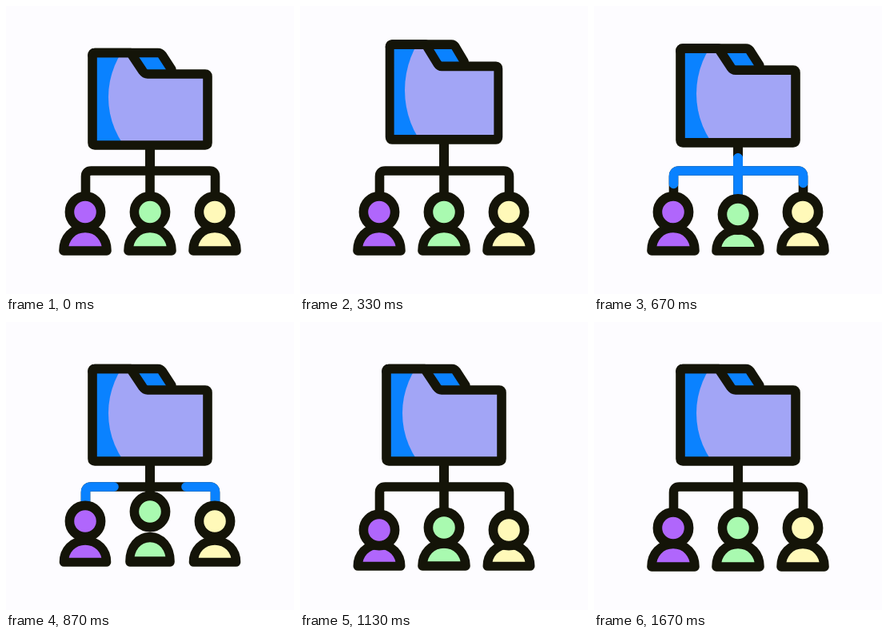
An HTML page that plays this animation: 360 by 360 pixels, repeating every 1870 ms.

```html
<!DOCTYPE html>
<html lang="en">
<head>
<meta charset="utf-8">
<title>Shared folder</title>
<style>
  html, body { margin: 0; width: 100%; height: 100%; overflow: hidden; background: #fdfcff; }
  svg { display: block; width: 100%; height: 100%; }
  .ink { stroke: #141408; stroke-width: 11.6; stroke-linejoin: round; stroke-linecap: round; }
  .wire { fill: none; }
  .pulse { fill: none; stroke: #0a82ff; stroke-width: 11.6; stroke-linejoin: round; stroke-linecap: round; }
</style>
</head>
<body>
<svg viewBox="0 0 360 360">
  <defs>
    <clipPath id="front"><path d="M108 58.5H156L174 85H252V174H108Z"/></clipPath>
  </defs>
  <g id="wires"></g>
  <g id="folder">
    <path fill="#0a82ff" d="M108 58.5H193L208 82V85H252V174H108Z"/>
    <circle cx="231.5" cy="114" r="103.5" fill="#a2a5f6" clip-path="url(#front)"/>
    <path class="ink" fill="none" d="M108 61.5Q108 58.5 111 58.5H190Q193 58.5 195 61L207 79.5"/>
    <path class="ink" fill="none" d="M156 59L171 81.5Q173.500 85 177 85H249Q252 85 252 88V171Q252 174 249 174H111Q108 174 108 171V61.500Q108 58.500 111 58.500H156"/>
  </g>
  <g id="people"></g>
</svg>
<script>
const LOOP = 1870, STEP = 200 / 3, LAST = 25;

// Rows: step, top shift, bottom shift, horizontal scale
const folderMoves = [
  [0, 0, 0, 1], [2, 3, 0, 1], [3, -8, -5, .97], [4, -17, -10, .94], [5, -10.5, -7, .942],
  [6, -2, -2, .98], [7, 1, 0, 1], [8, -2, -1, 1], [9, -5, -2.500, 1], [10, -5.5, -3, 1],
  [11, -3, -1.5, 1], [13, 0, 0, 1]
];

// Rows: step, head shift, body top shift, body bottom shift, horizontal scale
const middleMoves = [
  [7, 0, 0, 0, 1], [10, 3, 3, 0, 1], [11, -3, -1, -2, .99], [12, -13, -6, -5, .96],
  [13, -20.500, -9, -6, .94], [14, -17, -7, -5, .96], [15, -8, -3, -3, .99], [16, 1, 1, 0, 1],
  [17, -.5, -.5, -1, 1], [19, -6, -4, -2, 1], [21, 1, 0, 0, 1], [23, 0, 0, 0, 1]
];
const sideMoves = [
  [10, 0, 0, 0, 1], [11, 2, 2, 0, 1], [12, -3, -2, -3, 1], [13, -8.5, -4, -6, .985],
  [14, -19, -8, -6, .95], [15, -17, -7, -5, .96], [16, -7, -3, -2, .99], [17, 2.5, 1, -1, .99],
  [18, 2, 2, 0, 1], [21, -6, -5, -2, 1], [24, 0, 0, 0, 1]
];

// Rows: step, distance of the pulse's tail and tip along the wire
const pulseMoves = [
  [6, 0, 0], [7, 0, 50], [8, 0, 115], [9, 10, 132], [10, 30, 140], [11, 50, 160], [13, 91, 160], [16, 160, 160]
];

const $ = id => document.getElementById(id);

function add(parent, tag, attrs) {
  const el = document.createElementNS("http://www.w3.org/2000/svg", tag);
  for (const key in attrs) el.setAttribute(key, attrs[key]);
  return parent.appendChild(el);
}

function sample(rows, step) {
  const i = rows.findIndex(row => row[0] >= step);
  if (i < 0) return rows[rows.length - 1].slice(1);
  if (i === 0) return rows[0].slice(1);
  const a = rows[i - 1], b = rows[i];
  const mix = (step - a[0]) / (b[0] - a[0]);
  return a.slice(1).map((v, j) => v + (b[j + 1] - v) * mix);
}

function stretch(el, cx, top, bottom, dTop, dBottom, sx) {
  const sy = (bottom + dBottom - top - dTop) / (bottom - top);
  el.setAttribute("transform",
    `matrix(${sx} 0 0 ${sy} ${cx * (1 - sx)} ${bottom + dBottom - sy * bottom})`);
}

const wirePaths = [
  "M180 160V240",
  "M180 160V206H106.5Q99.5 206 99.5 213V240",
  "M180 160V206H254.5Q261.5 206 261.5 213V240"
];
for (const d of wirePaths) add($("wires"), "path", { d, class: "ink wire" });
const pulses = wirePaths.map(d => {
  const el = add($("wires"), "path", { d, class: "pulse" });
  return { el, length: el.getTotalLength() };
});

const people = [
  [99, "#b066fc", sideMoves], [180, "#a9fab0", middleMoves], [261, "#fff9b9", sideMoves]
].map(([x, fill, moves]) => {
  const body = add($("people"), "path", {
    class: "ink", fill,
    d: `M${x - 27} 306C${x - 27} 290 ${x - 16} 277.5 ${x} 277.5S${x + 27} 290 ${x + 27} 306Z`
  });
  const head = add($("people"), "circle", { class: "ink", fill, cx: x, cy: 257.5, r: 19.6 });
  return { x, body, head, moves };
});

function draw(step) {
  stretch($("folder"), 180, 52.7, 180, ...sample(folderMoves, step));

  for (const { x, body, head, moves } of people) {
    const [headShift, ...bodyShift] = sample(moves, step);
    head.setAttribute("transform", `translate(0 ${headShift})`);
    stretch(body, x, 272, 312, ...bodyShift);
  }

  const [tail, tip] = sample(pulseMoves, step);
  for (const { el, length } of pulses) {
    const span = Math.min(tip, length) - tail;
    el.style.display = span > 0 ? "" : "none";
    el.style.strokeDasharray = `${Math.max(span, 0)} 999`;
    el.style.strokeDashoffset = -tail;
  }
}

const start = performance.now();
function tick() {
  const time = (performance.now() - start) % LOOP;
  draw(Math.min(LAST, Math.floor((time + 3.5) / STEP)));
  requestAnimationFrame(tick);
}
tick();
</script>
</body>
</html>
```
